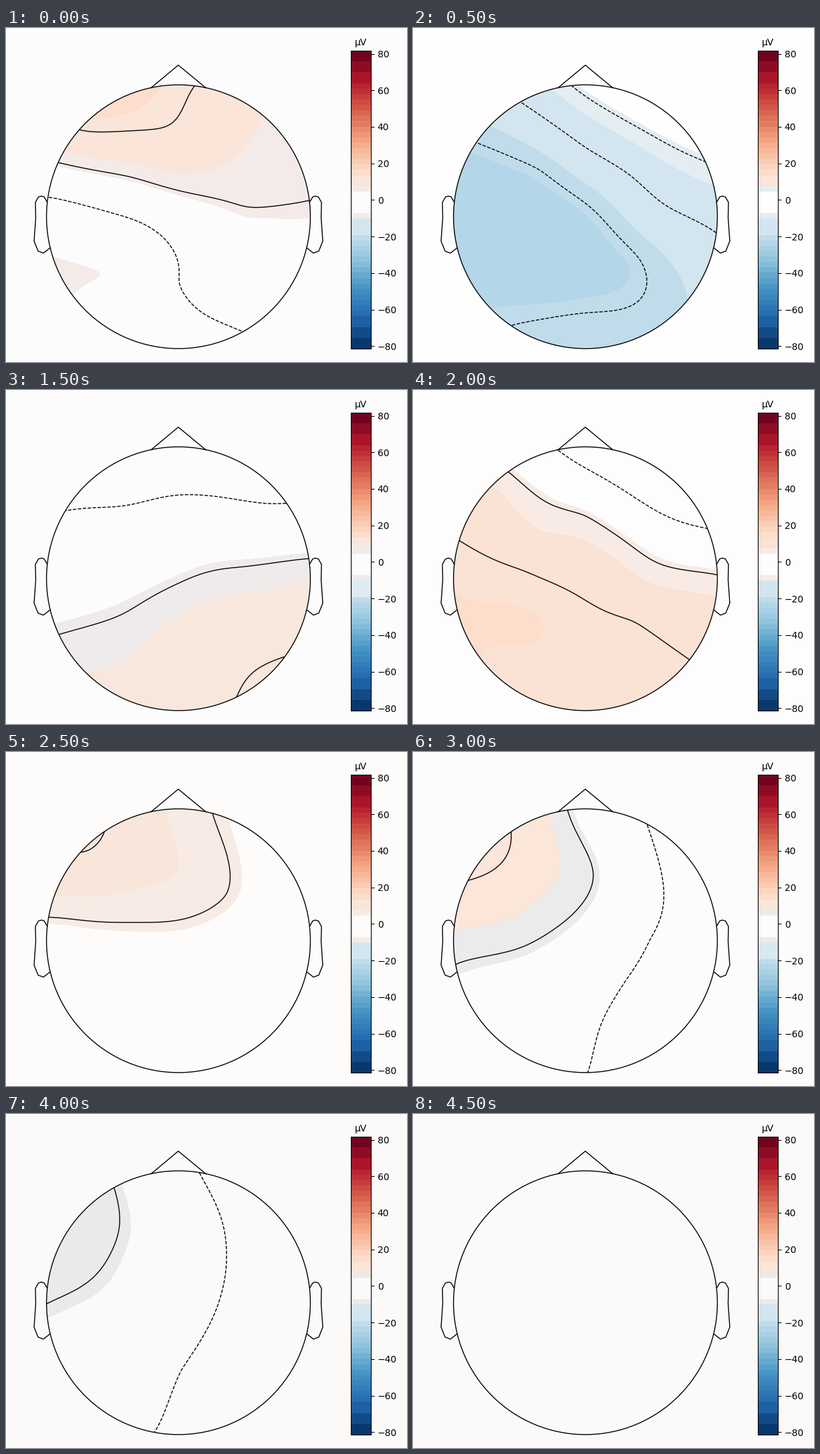
A matplotlib script for the animation above (5 s loop, 600 px wide and 500 px high).

```python
import numpy as np
import matplotlib
import matplotlib.pyplot as plt
from matplotlib.animation import ArtistAnimation
from matplotlib.patches import Circle, Rectangle

W, H = 600, 500
CX, CY, R = 258, 282.5, 197.4
VMAX, BANDS = 81.5, 55
LINES = -1.55 + 6.6 * np.arange(-3, 3)

plt.rcParams["font.family"] = "DejaVu Sans"
fig = plt.figure(figsize=(W / 100, H / 100), dpi=100)
ax = fig.add_axes([0, 0, 1, 1])
ax.set(xlim=(0, W), ylim=(H, 0))
ax.axis("off")
cax = fig.add_axes([516 / W, 1 - 480.4 / H, 30 / W, 446 / H])
head = ax.add_patch(Circle((CX, CY), R, fill=False, lw=1, zorder=6))


def ring(radius, n=8):
    """Sites clockwise from the nose, in head radii."""
    a = 2 * np.pi * np.arange(n) / n
    return radius * np.c_[np.sin(a), -np.cos(a)]


def kernel(a, b):
    r2 = ((a[:, None] - b[None]) ** 2).sum(-1)
    return r2 * np.log(r2 + 1e-12)


def with_plane(k, pts):
    return np.hstack([k, np.ones((len(pts), 1)), pts])


# Thin-plate spline from the sites to a grid, as one matrix
sites = np.vstack([[[0, 0]], ring(0.5), ring(1)])
axis = np.linspace(-1.02, 1.02, 160)
grid = np.stack(np.meshgrid(axis, axis), -1).reshape(-1, 2)
top = with_plane(kernel(sites, sites), sites)
system = np.vstack([top, np.hstack([top[:, -3:].T, np.zeros((3, 3))])])
spread = with_plane(kernel(grid, sites), grid) @ np.linalg.inv(system)[:, :len(sites)]


def shades(bg, gray, warm="#fbe4d8", cool="#d3e6ef"):
    """Band colours, lowest value first; the ends go in pairs."""
    d = np.arange(BANDS) - BANDS // 2
    size = np.where(abs(d) > 21, abs(d) // 2 * 2 + 0.5, abs(d))
    colors = matplotlib.colormaps["RdBu_r"](0.5 + np.sign(d) * size / BANDS)
    for lo, hi, color in [(-6, -4, cool), (-3, -3, gray), (-2, 1, bg),
                          (2, 2, gray), (3, 4, warm)]:
        colors[(d >= lo) & (d <= hi)] = matplotlib.colors.to_rgba(color)
    return colors


def scene(values, bg, *tints):
    colors = shades(bg, *tints)
    z = (spread @ values).reshape(len(axis), -1)
    xy = CX + R * axis, CY + R * axis
    back = ax.add_patch(Rectangle((0, 0), W, H, fc=bg, ec="none", zorder=0))
    fill = ax.contourf(*xy, z, np.linspace(-VMAX, VMAX, BANDS + 1),
                       colors=colors, zorder=1)
    arts = [back, fill]
    levels = [v for v in LINES if z.min() < v < z.max()]
    if levels:
        arts.append(ax.contour(*xy, z, levels, colors="k", linewidths=1, zorder=2))
    for art in arts[1:]:
        art.set_clip_path(head)
    arts.append(cax.imshow(colors[:, None], extent=(0, 1, -VMAX, VMAX), aspect="auto",
                           origin="lower", interpolation="nearest"))
    return arts


def outline():
    ax.plot([217, 257.8, 299], [89.6, 55.6, 89.6], "k", lw=1, zorder=6)
    ear = np.array([(61.5, 260.5), (57, 252.8), (53, 251.6), (48.5, 253), (44, 261),
                    (44.5, 284), (42, 319), (48, 334), (56, 337), (65.5, 329.5)])
    for x in ear[:, 0], 2 * CX - ear[:, 0]:
        ax.plot(x, ear[:, 1], "k", lw=1, zorder=6)


def reading(center, inner, outer):
    return np.array([center, *inner, *outer], float)


front = reading(1.7, (10, 7, 4.4, -0.2, -1.6, -6.5, -2.1, 6.2),
                (12.4, 7, 4.5, -0.6, -3, -6.8, -4.5, 12.7))
negative = reading(-22.4, (-15.2, -14, -16.7, -22, -23, -24.2, -24, -21.4),
                   (-6.8, -5, -13.4, -19.7, -19.2, -22.2, -25, -19))
diagonal = reading(-1, (-4.8, 0.4, 5.3, 7.4, 5.6, -1.6, -6.5, -7.5),
                   (-7, 0, 8.7, 11.7, 6.6, 1.5, -9.3, -13))
back = reading(10.4, (4.7, 3.5, 6.9, 11.9, 12.6, 13.4, 12.3, 7.6),
               (-4.5, -7.2, 5.5, 12.2, 12.8, 13.1, 13, 7.4))
corner = reading(3.8, (7.3, 5.1, 2.5, 1.5, 1.5, 1.5, 3.7, 7.1),
                 (6.6, 2.8, 2, 1, 1, 1.5, 3, 11.9))
sides = reading(1.8, (4.2, -2.9, -5.8, -5.5, -2.8, 2.6, 7.4, 8.1),
                (-0.6, -9.6, -9.6, -8, -4, 0.7, 10.2, 14))

outline()
frames = [
    scene(front, "#fcfcfc", "#f4ebe8"),
    scene(negative, "#fefefe", "#e4edf2", "#fbe4d8", "#d3e5ef"),
    scene(diagonal, "#fcfcfc", "#efebea", "#f8e7dc", "#deebf2"),
    scene((diagonal + back) / 2, "#fcfcfc", "#efebea", "#f8e7dc", "#deebf2"),
    scene(back, "#fdfdfd", "#f8ebe5", "#fae2d4"),
    scene(corner, "#fdfcfa", "#f8ebe5", "#f8e6da"),
    scene((corner + sides) / 2, "#fcfcfc", "#ebebeb", "#fce5d9", "#d8e9f1"),
    scene(sides, "#fcfcfc", "#ebebeb", "#fce5d9", "#d8e9f1"),
    scene(sides / 2, "#fbfaf8", "#ebeae8"),
    scene(sides * 0, "#fbfaf8", "#ebeae8"),
]
cax.set(xticks=[], yticks=range(-80, 81, 20), ylim=(-VMAX, VMAX))
cax.yaxis.tick_right()
cax.set_title("µV", fontsize=10)

anim = ArtistAnimation(fig, frames, interval=500, repeat=True, repeat_delay=0, blit=False)
plt.show()
```
